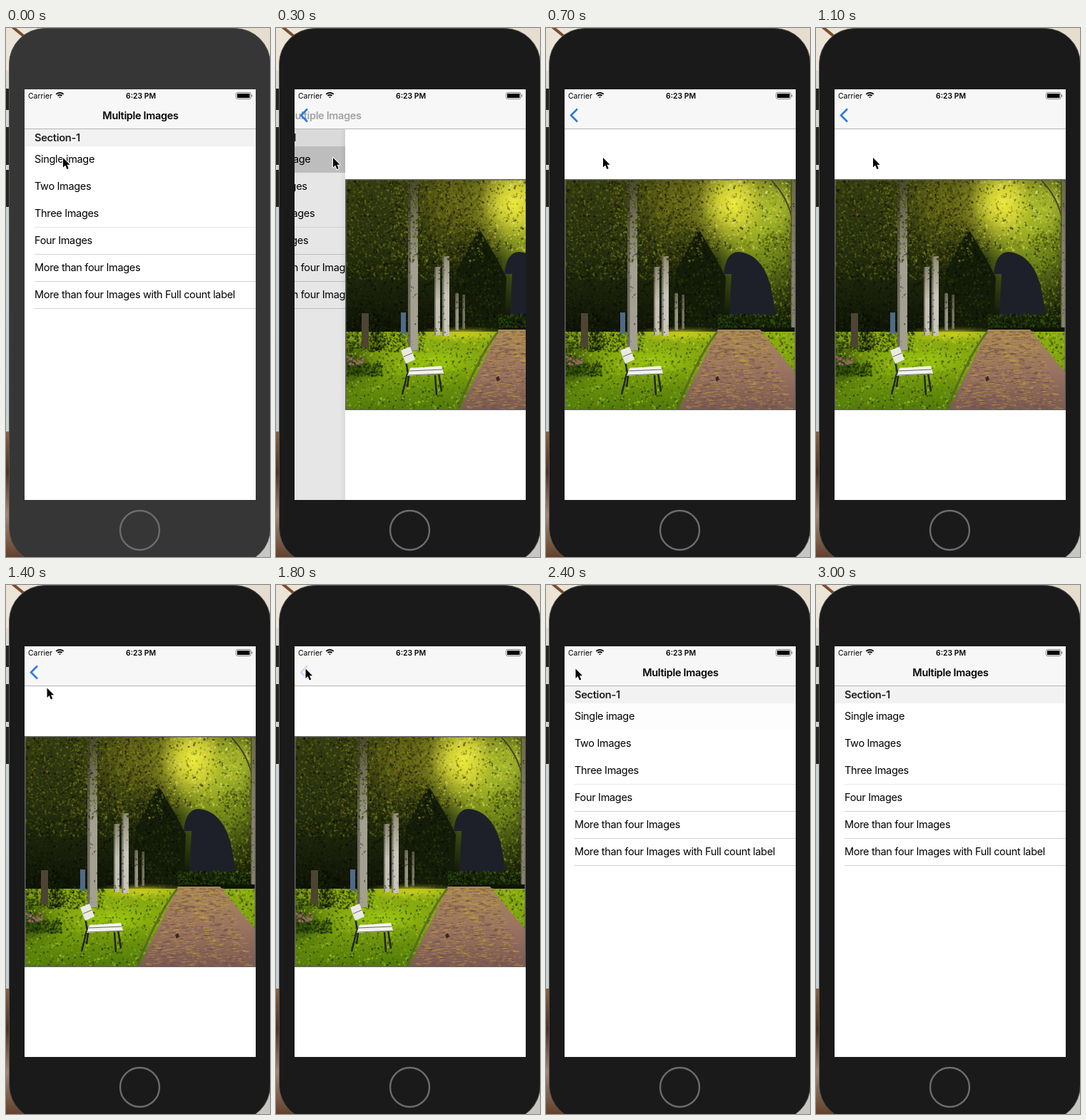
An HTML page with a canvas that plays this animation: 370x742 px, repeating every 3.1 s.

```html
<!DOCTYPE html>
<html lang="en">
<head>
<meta charset="utf-8">
<title>Photo list</title>
<style>
html, body { margin: 0; width: 100%; height: 100%; overflow: hidden; }
canvas { display: block; }
</style>
</head>
<body>
<canvas id="stage" width="370" height="742"></canvas>
<script>
const LOOP = 3100, STEP = 100;
const PUSH = 143, POP = 1833;          // start of the two page transitions
const LEFT = 26, TOP = 86, WIDTH = 324, HEIGHT = 576, BAR = 141;
const ROWS = ['Single image', 'Two Images', 'Three Images', 'Four Images',
  'More than four Images', 'More than four Images with Full count label'];
const ctx = document.getElementById('stage').getContext('2d');

const clamp = v => Math.max(0, Math.min(1, v));
const smooth = v => v * v * (3 - 2 * v);
// Critically damped spring, as used by page transitions
const spring = ms => ms <= 0 ? 0 : 1 - Math.exp(-0.01826 * ms) * (1 + 0.01826 * ms);

function rect(c, color, x, y, w, h) {
  c.fillStyle = color;
  c.fillRect(x, y, w, h);
}
function poly(c, color, points) {
  c.fillStyle = color;
  c.beginPath();
  points.forEach(([x, y]) => c.lineTo(x, y));
  c.closePath();
  c.fill();
}
function stroke(c, color, width, d) {
  c.strokeStyle = color;
  c.lineWidth = width;
  c.stroke(new Path2D(d));
}
function gradient(c, x0, y0, x1, y1, ...colors) {
  const g = c.createLinearGradient(x0, y0, x1, y1);
  colors.forEach((color, i) => g.addColorStop(i / (colors.length - 1), color));
  return g;
}
function text(str, x, y, size, weight = 400, align = 'left', color = '#000') {
  ctx.font = `${weight} ${size}px Inter, sans-serif`;
  ctx.letterSpacing = size > 12 ? '-0.33px' : '0px';
  ctx.textAlign = align;
  ctx.fillStyle = color;
  ctx.fillText(str, x, y);
}

function paintPark() {
  const canvas = document.createElement('canvas');
  canvas.width = canvas.height = WIDTH;
  const c = canvas.getContext('2d');
  c.translate(-LEFT, -212);
  let seed = 7;
  const rnd = () => (seed = seed * 16807 % 2147483647) / 2147483647;
  const specks = (n, x, y, w, h, size, color) => {
    for (let i = 0; i < n; i++) {
      const px = x + rnd() * w, py = y + rnd() * h, r = size * (0.4 + rnd());
      c.fillStyle = color(px, py);
      c.beginPath();
      c.ellipse(px, py, r, r * 0.7, rnd() * 3, 0, 7);
      c.fill();
    }
  };
  // Soft patch of light or shade; rgb is "r,g,b"
  const glow = (x, y, rx, ry, rgb, alpha) => {
    c.save();
    c.translate(x, y);
    c.scale(rx, ry);
    const g = c.createRadialGradient(0, 0, 0, 0, 0, 1);
    [1, 0.75, 0.25, 0].forEach((k, i) => g.addColorStop(i / 3, `rgba(${rgb},${alpha * k})`));
    rect(c, g, -1, -1, 2, 2);
    c.restore();
  };
  const trunk = (x, y, w, h, top, bottom) => {
    rect(c, gradient(c, 0, y, 0, y + h, top, bottom, bottom), x, y, w, h);
    rect(c, 'rgba(20,24,10,.4)', x, y, w * 0.25, h);
    specks(h / 6, x, y, w, h, 1, () => 'rgba(30,30,20,.6)');
  };
  const leaves = (n, x, y, w, h, hue, light) => specks(n, x, y, w, h, 1.5,
    () => `hsla(${hue - 12 + rnd() * 24}, 70%, ${light * 2 * rnd()}%, .5)`);

  // Trees and the clearing behind them
  rect(c, gradient(c, 0, 212, 0, 430, '#353d12', '#232c0e', '#0d1206'), 26, 212, 324, 324);
  glow(185, 245, 85, 85, '126,122,28', 0.75);
  leaves(3200, 26, 212, 210, 140, 66, 16);
  leaves(1600, 26, 330, 220, 98, 80, 7);
  glow(300, 290, 95, 130, '136,160,28', 1);
  glow(262, 245, 70, 80, '240,236,60', 1);
  glow(325, 250, 50, 60, '176,196,48', 0.8);
  leaves(900, 225, 212, 125, 100, 62, 40);
  leaves(700, 295, 290, 55, 115, 72, 22);
  poly(c, '#131b09', [[176, 428], [182, 340], [214, 282], [240, 326], [252, 350], [248, 428]]);
  leaves(700, 182, 300, 62, 125, 75, 9);
  stroke(c, '#4a4320', 2, 'M316 214 Q338 236 345 268');

  // Lawn and path
  rect(c, gradient(c, 0, 424, 0, 536, '#8fb010', '#7ba00c', '#4f7a0a'), 26, 426, 324, 110);
  glow(190, 430, 75, 12, '206,206,30', 0.9);
  glow(150, 468, 80, 26, '160,204,16', 0.8);
  glow(26, 470, 60, 50, '28,52,8', 0.8);
  leaves(2200, 26, 428, 324, 108, 74, 28);
  leaves(500, 26, 424, 112, 30, 82, 9);
  leaves(350, 28, 470, 50, 18, 92, 12);
  specks(45, 28, 460, 24, 12, 1.3, () => '#a3617e');
  poly(c, gradient(c, 0, 423, 0, 536, '#a8875a', '#9a7460', '#7c5a52'),
    [[241, 423], [300, 423], [350, 484], [350, 536], [186, 536]]);
  for (let i = 0; i < 900; i++) {
    const y = 425 + rnd() * 110, k = (y - 423) / 113;
    const x = 241 - 52 * k + rnd() * (58 + 100 * k);
    rect(c, rnd() < 0.55 ? 'rgba(196,160,56,.55)' : 'rgba(96,66,64,.5)', x, y, 2 + rnd() * 7, 1);
  }
  stroke(c, 'rgba(86,100,40,.8)', 3, 'M240 426 Q212 462 184 534');

  // Trunks and posts
  trunk(114, 212, 14, 240, '#4a4a2c', '#a3a091');
  trunk(151, 335, 8, 96, '#8b8672', '#c4c0b2');
  trunk(162, 320, 10, 112, '#8f8a74', '#c9c5b8');
  trunk(180, 372, 5, 52, '#6d6a56', '#9a9684');
  trunk(190, 374, 4, 48, '#55533f', '#77745f');
  trunk(343, 212, 6, 208, '#6f6c38', '#88846a');
  leaves(1300, 90, 212, 130, 115, 64, 19);
  rect(c, '#4d4433', 49, 400, 10, 48);
  rect(c, '#4f6a88', 104, 399, 7, 30);
  leaves(300, 61, 402, 17, 52, 85, 7);

  c.fillStyle = '#1e2029';
  c.fill(new Path2D('M249 345 Q252 314 270 314 Q315 318 321 402 L257 404 L260 345 Z'));
  leaves(700, 241, 402, 102, 18, 90, 13);

  // Bench
  stroke(c, '#20241c', 2.4, 'M111 468 L115 489 L113 503 M113 485 L106 514 M152 487 L154 515 M157 484 L161 510');
  poly(c, '#e9e9e4', [[104, 452], [117, 447], [124, 465], [111, 471]]);
  poly(c, '#f2f2ee', [[117, 477], [161, 474], [164, 485], [113, 488]]);
  stroke(c, '#64665e', 1, 'M108 461 L120 456 M116 481 L162 479 M114 487 L163 485');
  poly(c, '#3b2620', [[237, 491], [241, 488], [243, 493], [239, 496]]);

  c.strokeStyle = '#626262';
  c.lineWidth = 3;
  c.strokeRect(26, 212, 324, 324);
  return canvas;
}
const park = paintPark();

function drawPhone(color) {
  rect(ctx, gradient(ctx, 0, 0, 0, 742, '#ded9cc', '#cbd2d2', '#c6cfd1', '#d2d4d2'), 0, 0, 370, 742);
  rect(ctx, '#ece4d6', 0, 0, 60, 60);
  rect(ctx, '#e6ddcf', 310, 0, 60, 60);
  rect(ctx, '#c8c6c2', 310, 680, 60, 62);
  rect(ctx, gradient(ctx, 0, 564, 0, 742, '#8b6243', '#4e3323', '#a28873', '#63402b'), 0, 566, 30, 176);
  stroke(ctx, '#7a4c2b', 4, 'M6 -4 L28 14');
  for (const [y, h] of [[85, 30], [139, 53], [199, 52]]) rect(ctx, '#23251f', 0, y, 5, h);
  ctx.fillStyle = color;
  ctx.strokeStyle = '#555';
  ctx.lineWidth = 1;
  ctx.beginPath();
  ctx.roundRect(4.5, 0.5, 366, 751, 50);
  ctx.fill();
  ctx.stroke();
  ctx.strokeStyle = '#6c6c6c';
  ctx.lineWidth = 2.4;
  ctx.beginPath();
  ctx.arc(187.5, 704.5, 27.5, 0, 7);
  ctx.stroke();
}

function drawList(p, selected) {
  ctx.save();
  ctx.translate(-97 * p, 0);
  rect(ctx, '#fff', LEFT, BAR, WIDTH + 97, HEIGHT);
  rect(ctx, '#f2f2f2', LEFT, BAR, WIDTH + 97, 25);
  text('Section-1', 40, 159, 14.7, 600, 'left', '#222');
  rect(ctx, `rgba(209,209,209,${selected})`, LEFT, 166, WIDTH + 97, 37);
  ROWS.forEach((row, i) => {
    text(row, 40, 189 + 38 * i, 14.5);
    if (i > 1) rect(ctx, i === 2 ? '#e8e8e8' : '#d2d2d2', 40, 203 + 38 * i, WIDTH + 97, 1);
  });
  ctx.restore();
  rect(ctx, `rgba(0,0,0,${0.125 * p})`, LEFT, BAR, WIDTH, HEIGHT);
}

function drawPage(p) {
  const x = LEFT + Math.round(WIDTH * (1 - p));
  rect(ctx, gradient(ctx, x - 8, 0, x, 0, 'rgba(0,0,0,0)', 'rgba(0,0,0,.05)'), x - 8, BAR, 8, HEIGHT);
  rect(ctx, '#fff', x, BAR, WIDTH, HEIGHT);
  ctx.drawImage(park, x, 212);
}

function drawBar(p, pressed) {
  rect(ctx, '#f7f7f7', LEFT, TOP, WIDTH, 55);
  rect(ctx, '#b4b4b4', LEFT, BAR, WIDTH, 1);
  text('Carrier', 31, 98.5, 10.4);
  text('6:23 PM', 189, 98.5, 10.4, 600, 'center');
  ctx.strokeStyle = '#000';
  ctx.lineWidth = 1.8;
  for (const r of [1, 4.2, 7.4]) {
    ctx.beginPath();
    ctx.arc(75.5, 98.2, r, -Math.PI * 0.75, -Math.PI * 0.25);
    ctx.stroke();
  }
  ctx.strokeStyle = '#777';
  ctx.lineWidth = 0.9;
  ctx.beginPath();
  ctx.roundRect(322.5, 90.5, 20.5, 9, 2);
  ctx.stroke();
  rect(ctx, '#000', 324, 92, 17.5, 6);
  rect(ctx, '#777', 344, 93.5, 1.2, 3);

  ctx.globalAlpha = (1 - p) ** 0.7;
  text('Multiple Images', 188.5 - 200 * p + 56 * p * p, 127.5, 14.5, 600, 'center');
  ctx.globalAlpha = clamp(p * 1.3) * (pressed ? 0.22 : 1);
  stroke(ctx, '#2878e6', 2.5, 'M44 113.5 L35 122.5 L44 131.5');
  ctx.globalAlpha = 1;
}

function drawCursor(t) {
  const k = smooth(clamp((t - 1150) / 450));
  ctx.save();
  ctx.translate(80 - 38.5 * k, 182 - 64.5 * k);
  const arrow = 'M0 0 V13.5 L3.1 10.6 L5.4 16 L7.7 15 L5.5 9.8 H9.6 Z';
  ctx.lineJoin = 'round';
  stroke(ctx, '#fff', 2, arrow);
  ctx.fillStyle = '#000';
  ctx.fill(new Path2D(arrow));
  ctx.restore();
}

function draw(now) {
  const t = Math.floor(now % LOOP / STEP) * STEP;
  const p = t < POP ? spring(t - PUSH) : 1 - spring(t - POP);
  const selected = t < 100 ? 0 : clamp(1 - (t - POP) / 600);
  drawPhone(t < 100 ? '#363636' : '#1a1a1a');
  ctx.save();
  ctx.beginPath();
  ctx.rect(LEFT, TOP, WIDTH, HEIGHT);
  ctx.clip();
  drawList(p, selected);
  if (p > 0.002) drawPage(p);
  drawBar(p, t >= 1700);
  ctx.restore();
  if (t < 2600) drawCursor(t);
}

const start = performance.now();
function tick() {
  draw(performance.now() - start);
  requestAnimationFrame(tick);
}
tick();
</script>
</body>
</html>
```
